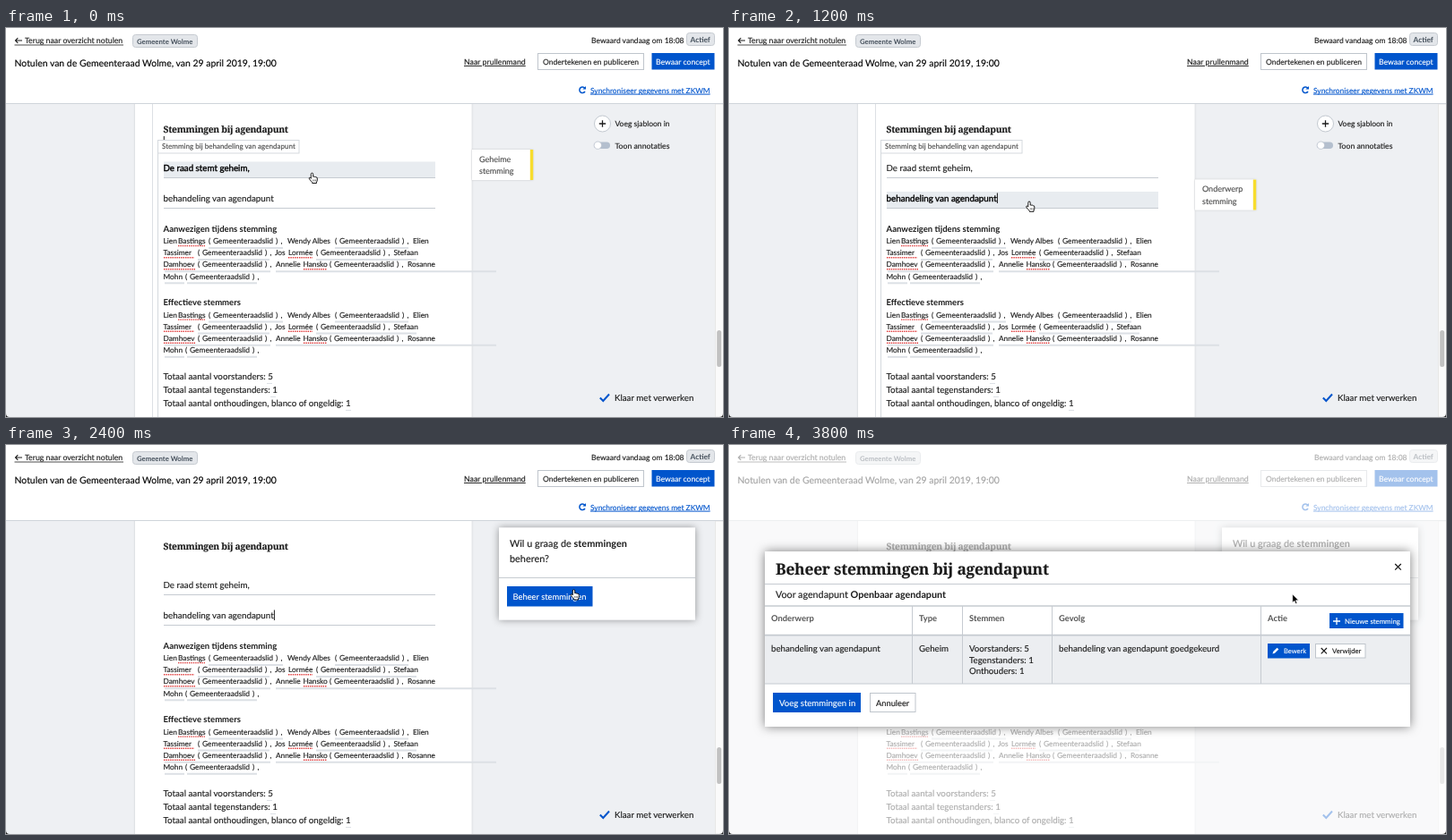
An HTML page that plays this animation: 800x435 px, repeating every 4 s.

```html
<!DOCTYPE html>
<html lang="nl">
<head>
<meta charset="utf-8">
<title>Notulen</title>
<style>
html, body { margin: 0; width: 100%; height: 100%; overflow: hidden; background: #fff; }
svg { display: block; width: 100%; height: 100%; }
text { font-family: Lato, "Open Sans", sans-serif; text-rendering: geometricPrecision; white-space: pre; stroke-width: .14; }
.serif { font-family: "Noto Serif", "DejaVu Serif", serif; font-weight: 700; }
.b { font-weight: 700; stroke-width: 0; }
.u { text-decoration: underline; }
.strong { fill: #000; stroke: #000; stroke-width: .38; }
</style>
</head>
<body>
<svg id="stage" viewBox="0 0 800 435" xmlns="http://www.w3.org/2000/svg"></svg>
<script>
const BLUE = '#0055cc', INK = '#1c1c1c', LINE = '#c6cbd1', GREY = '#dce0e5';
const LOOP = 4000, STEP = 100;

const text = (x, y, size, str, fill = INK, cls = '', extra = '') =>
  `<text x="${x}" y="${y}" font-size="${size}" fill="${fill}" stroke="${fill}" class="${cls}" ${extra}>${str}</text>`;
const rect = (x, y, w, h, fill, extra = '') =>
  `<rect x="${x}" y="${y}" width="${w}" height="${h}" fill="${fill}" ${extra}/>`;
const path = (d, stroke, width = 1, extra = '') =>
  `<path d="${d}" stroke="${stroke}" stroke-width="${width}" fill="none" ${extra}/>`;
const hline = (x1, x2, y, stroke = LINE, width = 1) => path(`M${x1} ${y}H${x2}`, stroke, width);
const vline = (x, y1, y2, stroke = LINE, width = 1) => path(`M${x} ${y1}V${y2}`, stroke, width);
const group = (id, body, extra = '') => `<g id="${id}" ${extra}>${body}</g>`;
const border = (c = LINE) => `stroke="${c}"`;

function header() {
  return rect(0, 0, 800, 84, '#fff') + hline(0, 800, 84.5, '#cfd4da') +
    path('M18 14H10.5M13.3 11.2L10.5 14L13.3 16.8', INK, 1.1) +
    text(21, 17, 8.75, 'Terug naar overzicht notulen') + hline(9.5, 131, 19, INK, .8) +
    rect(141.5, 7.5, 72, 14, '#e3e6ea', 'rx="3" ' + border()) +
    text(146, 17.5, 7.75, 'Gemeente Wolme', '#45505c', 'b') +
    text(9.5, 43.2, 10.45, 'Notulen van de Gemeenteraad Wolme, van 29 april 2019, 19:00', '#000') +
    text(653, 16.5, 8.5, 'Bewaard vandaag om 18:08') +
    rect(759.5, 5.5, 31, 14, '#e3e6ea', 'rx="3" ' + border()) +
    text(763.5, 15.7, 8.3, 'Actief', '#45505c', 'b') +
    text(511, 41, 8.8, 'Naar prullenmand', INK, 'u') +
    rect(593.5, 28.5, 118, 18, '#fff', border('#bfc5cc')) +
    text(599, 41, 8.55, 'Ondertekenen en publiceren') +
    rect(720.5, 28, 70, 18.5, BLUE) + text(725, 41, 8.65, 'Bewaar concept', '#fff') +
    path('M645.8 67.2A3.3 3.3 0 1 0 646 71', BLUE, 1.5) +
    `<path d="M647 65V68.6H643.4Z" fill="${BLUE}"/>` +
    text(652, 72.7, 8.4, 'Synchroniseer gegevens met ZKWM', BLUE, 'u');
}

function sidebar() {
  return `<circle cx="665.5" cy="107" r="9" fill="#fff" ${border('#c3c9d0')}/>` +
    path('M661.8 107H669.2M665.5 103.3V110.7', INK, 1.3) +
    text(679.5, 110.3, 8.5, 'Voeg sjabloon in') +
    rect(656, 127.5, 18, 7.5, '#b4bfce', 'rx="3.75"') +
    `<circle cx="660.3" cy="131.2" r="4.2" fill="#fff" ${border('#b9c1cc')} stroke-width=".8"/>` +
    text(679.5, 134.5, 8.7, 'Toon annotaties') +
    path('M662.8 413.5L666.3 417L673 409.5', BLUE, 2) +
    text(679, 416.5, 9.75, 'Klaar met verwerken') +
    rect(791.5, 85, 9, 350, '#fafafa', border('#e7e7e7')) +
    rect(793.2, 338, 5, 41, '#c1c1c1', 'rx="2.5"');
}

// Each line: words [x, text], x of each "( Gemeenteraadslid ) ,", misspelt spans, grey bars
const MEMBERS = [
  { words: [[175.5, 'Lien'], [192, 'Bastings'], [314, 'Wendy Albes'], [454, 'Elien']],
    roles: [226, 367], wrong: [[192, 222]], bars: [[226, 309], [367, 449]] },
  { words: [[175.5, 'Tassimer'], [300, 'Jos'], [315, 'Lormée'], [432.5, 'Stefaan']],
    roles: [214, 346], wrong: [[176, 210]], bars: [[214, 294], [346, 458]] },
  { words: [[175.5, 'Damhoev'], [301, 'Annelie'], [331.5, 'Hansko'], [448, 'Rosanne']],
    roles: [214, 361], wrong: [[176, 211], [332, 358]], bars: [[177, 295], [301, 547]] },
  { words: [[175.5, 'Mohn']], roles: [200], wrong: [], bars: [[177, 199], [202, 280]] }
];
MEMBERS[1].wrong.push([315, 342]);

function members(top) {
  return MEMBERS.map((m, i) => {
    const y = top + i * 13.1, put = (x, s, size = 8.3) => text(x, y, size, s);
    return m.bars.map(([a, b]) => hline(a, b, y + 4.8, GREY, 2)).join('') +
      m.words.map(w => put(...w)).join('') +
      m.roles.map(x => put(x, '(') + put(x + 5, 'Gemeenteraadslid', 8.45) + put(x + 75, ')') + put(x + 80.5, ',')).join('') +
      m.wrong.map(([a, b]) => path(`M${a} ${y + 2.4}H${b}`, '#e03a3a', 1.4, 'stroke-dasharray="1.4 1"')).join('');
  }).join('');
}

function page() {
  const totals = [['voorstanders: 5', 291], ['tegenstanders: 1', 295], ['onthoudingen, blanco of ongeldig: 1', 379]];
  return rect(0, 85, 800, 350, '#eef0f3') +
    rect(144, 80, 375.5, 380, '#fff', 'filter="url(#soft)"') +
    group('row0', rect(176, 149.5, 303, 18, '#e8ecf0')) +
    group('row1', rect(176, 183, 303, 18, '#e8ecf0')) +
    text(175.5, 117, 10.3, 'Stemmingen bij agendapunt', INK, 'serif', 'letter-spacing="-.3"') +
    group('caret0', vline(176.3, 121, 126, '#000', .9)) +
    group('label', vline(163.5, 85, 435, '#dde0e4') + vline(169.5, 140, 435, '#d5d9de') +
      rect(169.5, 125.5, 157.5, 14.5, '#fff', border('#d5d9de')) +
      text(174, 135.3, 8.05, 'Stemming bij behandeling van agendapunt', '#4c4c4c')) +
    text(175.5, 160.3, 9.75, 'De raad stemt geheim,', INK, '', 'id="line0"') + hline(176, 479, 167.5) +
    text(175.5, 194, 9.8, 'behandeling van agendapunt', INK, '', 'id="line1"') + hline(176, 479, 201.5) +
    group('caret1', vline(299.4, 184.5, 196, '#000', .9)) +
    text(175.5, 227.5, 9.55, 'Aanwezigen tijdens stemming', INK, 'b') + members(241.2) +
    text(175.5, 310, 9.55, 'Effectieve stemmers', INK, 'b') + members(323.7) +
    totals.map(([s, x], i) => text(175.5, 392.7 + i * 15, 9.75, 'Totaal aantal ' + s) +
      hline(x, x + 6, 397.5 + i * 15, GREY)).join('');
}

const card = () => group('card',
  rect(520, 0, 68, 34, '#fff', 'filter="url(#soft)"') + rect(584.8, 0, 3.4, 34, '#f7dd2e') +
  text(528, 13.6, 9, '', '#4c4c4c', '', 'id="topic"') + text(528, 27.4, 9, 'stemming', '#4c4c4c'));

const popup = () => group('popup',
  rect(550, 92.5, 219, 103, '#fff', 'filter="url(#shade)"') +
  text(562, 114, 10.9, 'Wil u graag de <tspan class="b">stemmingen</tspan>') +
  text(562, 130.6, 10.9, 'beheren?') + hline(550, 769, 148.5) +
  rect(559, 158, 95.5, 22.5, BLUE, 'id="manage"') +
  text(565.5, 172.6, 9.4, 'Beheer stemmingen', '#fff'));

function modal() {
  const cols = [[47, 'Onderwerp'], [212, 'Type'], [268, 'Stemmen'], [368, 'Gevolg'], [601, 'Actie']];
  const cell = (x, y, s) => text(x, y, 9.7, s);
  return rect(40, 119, 720, 196, '#fff', 'filter="url(#deep)"') +
    text(52, 145.3, 17.4, 'Beheer stemmingen bij agendapunt', INK, 'serif', 'letter-spacing="-.25"') +
    path('M743.2 133L749.8 139.6M749.8 133L743.2 139.6', INK, 1.3) + hline(40, 760, 155.5) +
    text(52, 171, 10.75, 'Voor agendapunt <tspan class="b">Openbaar agendapunt</tspan>') +
    rect(40, 213, 720, 54, '#eceef1') +
    hline(40, 760, 180, LINE, 1.6) + hline(40, 760, 212.7, LINE, 1.8) + hline(40, 760, 267, LINE, 1.2) +
    [204.5, 260.5, 360.5, 593.5].map(x => vline(x, 180, 267)).join('') +
    cols.map(([x, s]) => text(x, 197.3, 9.4, s, '#555', 'b')).join('') +
    cell(47, 231, 'behandeling van agendapunt') + cell(212, 231, 'Geheim') +
    ['Voorstanders: 5', 'Tegenstanders: 1', 'Onthouders: 1'].map((s, i) => cell(268, 231 + i * 12.5, s)).join('') +
    cell(368, 231, 'behandeling van agendapunt goedgekeurd') +
    rect(670, 188, 82.5, 17, BLUE) + path('M674 197H682M678 193V201', '#fff', 1.3) +
    text(687, 199.8, 7.8, 'Nieuwe stemming', '#fff') +
    rect(601, 222, 47, 16.5, BLUE) + `<path d="M606.5 233.5L607.2 231L611.5 226.7L613.3 228.5L609 232.8Z" fill="#fff"/>` +
    text(619, 233, 7.5, 'Bewerk', '#fff') +
    rect(654.5, 222.5, 55.5, 15.5, '#fff', border('#bfc5cc')) +
    path('M660.7 227L667 233.3M667 227L660.7 233.3', INK, 1.2) + text(673, 233, 7.7, 'Verwijder') +
    rect(49, 277, 98, 22, BLUE) + text(56, 291.5, 9.6, 'Voeg stemmingen in', '#fff') +
    rect(157.5, 277.5, 50.5, 21, '#fff', border('#bfc5cc')) + text(164, 291.5, 9.3, 'Annuleer');
}

const shadow = (id, dev, alpha) =>
  `<filter id="${id}" x="-20%" y="-30%" width="140%" height="160%"><feDropShadow dx="0" dy="0" stdDeviation="${dev}" flood-color="#000" flood-opacity="${alpha}"/></filter>`;

const cursor = () => group('cursor',
  group('hand', `<path d="M-1.2 1Q-1.2 -.3 0 -.3Q1.2 -.3 1.2 1V3.8Q2 3.2 2.8 4Q3.8 3.5 4.4 4.4Q5.8 4.2 5.8 5.6V7.6Q5.8 8.8 5 9.6V11H.2V10Q-1.5 8.6 -3 6.4Q-3.8 5 -2.8 4.8Q-2 4.6 -1.2 5.8Z" fill="#fff" stroke="#000" stroke-width=".9"/>` +
    path('M1.2 7V9M2.7 7V9M4.2 7V9', '#000', .5)) +
  group('beam', path('M-2.6 -5.2Q0 -5.2 0 -3.8Q0 -5.2 2.6 -5.2M0 -4V4M-2.6 5.2Q0 5.2 0 3.8Q0 5.2 2.6 5.2M-1.3 2H1.3', '#111', 1)) +
  group('arrow', `<path d="M0 0V9.5L2.2 7.6L3.6 10.8L5.2 10.1L3.8 7H6.8Z" fill="#000" stroke="#fff" stroke-width=".7"/>`));

document.getElementById('stage').innerHTML =
  `<defs>${shadow('soft', 1, .18)}${shadow('shade', 4, .4)}${shadow('deep', 6, .5)}</defs>` +
  page() + sidebar() + card() + popup() + header() +
  group('veil', rect(0, 0, 800, 435, '#fff', 'opacity=".64"') + modal()) +
  '<path d="M0 431V435H4Q0 435 0 431ZM800 431V435H796Q800 435 800 431Z" fill="#222"/>' + cursor();

const $ = id => document.getElementById(id);
const show = (id, on) => $(id).setAttribute('visibility', on ? 'visible' : 'hidden');
const clamp = v => Math.max(0, Math.min(1, v));
const ease = v => v * v * (3 - 2 * v);

// Pointer route: time, x, y
const ROUTE = [
  [0, 341.5, 162.5], [100, 341.5, 162.5], [500, 341, 172], [1000, 335, 194.3],
  [1900, 335, 194.3], [2300, 633.5, 162], [2500, 633.5, 162], [2900, 628.7, 166.8], [LOOP, 628.7, 166.8]
];

function pointer(t) {
  const i = ROUTE.findIndex(k => k[0] > t), [t0, x0, y0] = ROUTE[i - 1], [t1, x1, y1] = ROUTE[i];
  const k = ease((t - t0) / (t1 - t0));
  return [x0 + (x1 - x0) * k, y0 + (y1 - y0) * k];
}

function draw(time) {
  const t = Math.floor(time % LOOP / STEP) * STEP;
  const [x, y] = pointer(t);
  const inside = (a, b, c, d) => x > a && x < b && y > c && y < d;
  const rows = [inside(176, 479, 149, 168), inside(176, 479, 183, 202)];
  const onButton = inside(559, 654, 158, 180);
  const dialog = clamp((t - 3000) / 400);

  rows.forEach((on, i) => {
    show('row' + i, on);
    $('line' + i).setAttribute('class', on ? 'strong' : '');
  });
  show('card', rows[0] || rows[1]);
  $('card').setAttribute('transform', `translate(0 ${rows[0] ? 136 : 169.5})`);
  $('topic').textContent = rows[0] ? 'Geheime' : 'Onderwerp';
  show('label', x < 519);

  show('caret0', t < 300 || t >= 800 && t < 1100);
  show('caret1', t >= 1100 && t < 1900 || t >= 2400 && t < 2900);

  $('popup').setAttribute('opacity', ease(clamp((t - 1300) / 400)));
  $('manage').setAttribute('fill', t >= 2500 ? '#0049b0' : BLUE);
  $('manage').setAttribute('stroke', t >= 2900 ? '#e3c23c' : 'none');

  $('veil').setAttribute('opacity', dialog);
  const hand = (rows[0] || rows[1] || onButton) && t < 3200;
  const beam = !hand && x < 519;
  show('hand', hand);
  show('beam', beam);
  show('arrow', !hand && !beam);
  $('cursor').setAttribute('transform', `translate(${x} ${y})`);
}

function tick() {
  draw(performance.now());
  requestAnimationFrame(tick);
}
tick();
</script>
</body>
</html>
```
